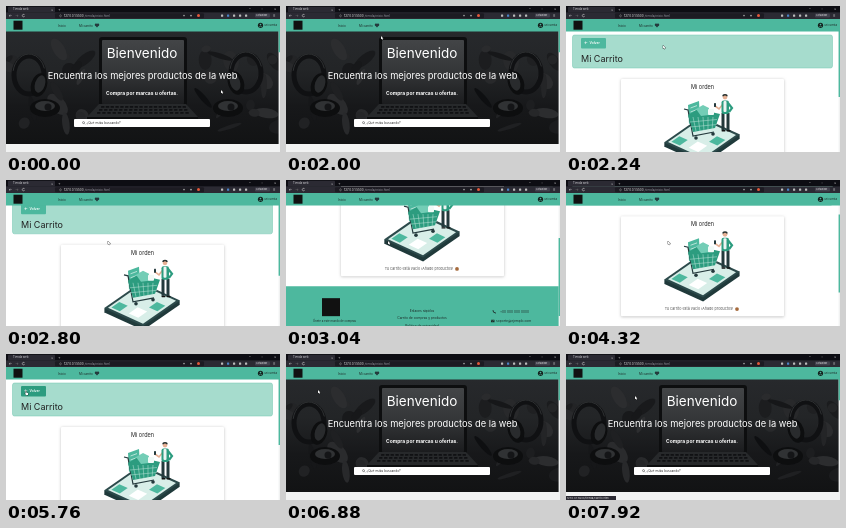
Recreate the animation shown at these times as an HTML page with a canvas. Size 274x146 px, loop 8000 ms.

```html
<!DOCTYPE html>
<html lang="es">
<head>
<meta charset="utf-8">
<title>Tienda</title>
<style>
html, body { margin: 0; width: 100%; height: 100%; overflow: hidden; background: #1c1b22; }
canvas { display: block; width: 274px; height: 146px; }
</style>
</head>
<body>
<canvas id="stage"></canvas>
<script>
const W = 274, H = 146, LOOP = 8000, STEP = 80;
const TEAL = '#4db89e', GREEN = '#2c9c7f', INK = '#1e2927', DARK = '#24393c', SKIN = '#e5b094';
const VIEW_TOP = 13, VIEW = H - VIEW_TOP;
const CART_HEIGHT = VIEW + 94, HOME_HEIGHT = VIEW * 4;

const canvas = document.getElementById('stage');
const ratio = window.devicePixelRatio || 1;
canvas.width = W * ratio;
canvas.height = H * ratio;
const c = canvas.getContext('2d');
c.scale(ratio, ratio);

const linear = k => k;
const smooth = k => k * k * (3 - 2 * k);
const glide = k => 1 - (1 - k) ** 1.4;

// Each move goes from the previous values to its own between start and end.
const scrolls = [
  { start: 2720, end: 3160, to: [94], ease: smooth },
  { start: 4000, end: 4400, to: [30], ease: glide },
  { start: 4640, end: 5200, to: [0], ease: smooth },
];
const moves = [
  { start: 560, end: 640, to: [97, 48] },
  { start: 720, end: 800, to: [111, 67] },
  { start: 1360, end: 1520, to: [75, 20] },
  { start: 1920, end: 2000, to: [95, 30] },
  { start: 2000, end: 2800, to: [102, 61] },
  { start: 4640, end: 5200, to: [25, 42] },
  { start: 5600, end: 5760, to: [19, 37] },
  { start: 6160, end: 6880, to: [32, 36] },
  { start: 6960, end: 7600, to: [109, 44] },
  { start: 7680, end: 7760, to: [92, 21] },
  { start: 7760, end: 7920, to: [69, 42] },
];

function follow(list, from, t) {
  return list.reduce((at, { start, end, to, ease = linear }) => {
    const k = ease(Math.min(1, Math.max(0, (t - start) / (end - start))));
    return at.map((v, i) => v + (to[i] - v) * k);
  }, from);
}

function seeded(seed) {
  return () => (seed = seed * 16807 % 2147483647) / 2147483647;
}

function rect(x, y, w, h, fill, r = 0) {
  c.fillStyle = fill;
  c.beginPath();
  c.roundRect(x, y, w, h, r);
  c.fill();
}

function oval(x, y, rx, ry, fill, tilt = 0) {
  c.fillStyle = fill;
  c.beginPath();
  c.ellipse(x, y, rx, ry, tilt, 0, 7);
  c.fill();
}

const disc = (x, y, r, fill) => oval(x, y, r, r, fill);

function ring(x, y, rx, ry, color, width, from = 0, to = Math.PI * 2) {
  c.strokeStyle = color;
  c.lineWidth = width;
  c.beginPath();
  c.ellipse(x, y, rx, ry, 0, from, to);
  c.stroke();
}

function trace(points, closed) {
  c.beginPath();
  points.forEach(p => c.lineTo(...p));
  if (closed) c.closePath();
}

function poly(fill, ...points) {
  trace(points, true);
  c.fillStyle = fill;
  c.fill();
}

function line(color, width, ...points) {
  trace(points);
  c.strokeStyle = color;
  c.lineWidth = width;
  c.stroke();
}

function text(str, x, y, size, color, align = 'left', weight = 400) {
  c.font = `${weight} ${size}px Inter, sans-serif`;
  c.textAlign = align;
  c.textBaseline = 'middle';
  c.fillStyle = color;
  c.fillText(str, x, y);
}

function gradient(y0, y1, ...colors) {
  const g = c.createLinearGradient(0, y0, 0, y1);
  colors.forEach((col, i) => g.addColorStop(i / (colors.length - 1), col));
  return g;
}

function drawBrowser() {
  rect(0, 0, W, 6.5, '#0d0d13');
  rect(2, 0.8, 47, 5.7, '#2b2a33', 1);
  text('Tienda web', 7, 3.6, 2.8, '#d5d5da');
  text('×', 45, 3.5, 3.5, '#bbb');
  text('+', 52, 3.5, 4, '#bbb');
  ['–', '▫', '×'].forEach((s, i) => text(s, 243 + i * 12.5, 3.2, 3.5, '#ccc'));

  rect(0, 6.5, W, 6.5, '#2b2a33');
  text('←', 2.5, 9.6, 4, '#ddd');
  text('→', 9, 9.6, 4, '#777');
  ring(17.5, 9.6, 1.3, 1.3, '#ddd', 0.5, 0.4, 5.8);
  rect(49, 7.3, 149, 5, '#1c1b22', 1);
  ring(54.5, 9.8, 0.8, 1.1, '#aaa', 0.4);
  text('127.0.0.1:5500', 58, 9.9, 3, '#eee');
  text('/tienda/inicio.html', 78.5, 9.9, 3, '#96969f');
  disc(178, 9.6, 0.8, '#aaa');
  disc(185, 9.6, 0.9, '#aaa');
  disc(192.5, 9.6, 1.5, '#e3583b');
  for (let i = 0; i < 5; i++) rect(215 + i * 6, 8.5, 2.2, 2.2, i === 1 ? '#4d83c7' : '#bbb', 0.5);
  rect(249, 7.6, 15, 4, '#42414d', 1);
  text('Actualizar', 250, 9.7, 2.4, '#ddd');
  text('≡', 267, 9.7, 4, '#ddd');
}

function drawNav() {
  rect(0, 13, W, 12.5, TEAL);
  rect(7.5, 14.7, 9, 9, '#111');
  text('Inicio', 52, 19.6, 3.1, INK);
  text('Mi carrito', 73, 19.6, 3.1, INK);
  disc(90, 18.7, 1.25, DARK);
  disc(92, 18.7, 1.25, DARK);
  poly(DARK, [88.9, 19.3], [93.1, 19.3], [91, 21.6]);
  disc(254.5, 19.3, 2.6, '#15211e');
  disc(254.5, 18.5, 0.8, TEAL);
  ring(254.5, 21.3, 1.3, 1.1, TEAL, 0.6, Math.PI, 0);
  text('Mi cuenta', 258.5, 19.6, 2.7, INK);
}

function drawScrollbar(scroll, height) {
  const scale = VIEW / height;
  rect(272.6, VIEW_TOP, 1.4, VIEW, '#f1f2f2');
  rect(272.6, VIEW_TOP + scroll * scale, 1.4, VIEW * scale, TEAL);
}

function headset(x, y, facing) {
  ring(x, y, 15, 19, '#101113', 5);
  ring(x, y - 1, 16, 20, '#3d3f41', 0.7, 3.3, 6);
  oval(x + facing * 10, y + 10, 8, 12, '#0d0e0f', facing * 0.3);
  oval(x + facing * 11, y + 9, 5, 9, '#292b2d', facing * 0.3);
}

function drawPhoto() {
  rect(0, 25, W, 113, gradient(25, 138, '#27292c', '#232527', '#17181a', '#121314'));

  // dim clutter on both sides of the desk
  const random = seeded(41);
  for (let i = 0; i < 36; i++) {
    const side = random() * 82, x = i % 2 ? side : W - side;
    const shade = 14 + random() * 32;
    oval(x, 40 + random() * 82, 4 + random() * 9, 2 + random() * 6,
      `rgb(${shade},${shade + 1},${shade + 3})`, random() * 3);
  }
  headset(23, 69, 1);
  headset(240, 67, -1);
  for (const x of [39, 222]) {
    oval(x, 102, 15, 9, '#0d0e0f');
    oval(x, 100, 10, 5, '#303234');
    disc(x + 3, 101, 3.5, '#141517');
  }

  // open computer with its keyboard
  rect(93, 31, 88, 72, '#0d0e0f', 3);
  rect(96, 34, 82, 64, gradient(34, 98, '#434547', '#343638', '#1b1c1e'), 1);
  poly('#27292b', [93, 98], [180, 98], [192, 111], [81, 111]);
  for (let row = 0; row < 3; row++) {
    for (let i = 0; i < 18; i++) {
      rect(95 - row * 2 + i * (4.8 + row * 0.2), 100 + row * 3, 3.4, 1.8, '#101113', 0.4);
    }
  }
  rect(81, 111, 111, 2, '#0c0d0e');
}

function drawHome() {
  rect(0, 13, W, 133, '#f1f2f2');
  drawPhoto();
  text('Bienvenido', 136, 48, 13.5, '#fff', 'center');
  text('Encuentra los mejores productos de la web', 136.5, 69.8, 9.3, '#fff', 'center');
  text('Compra por marcas u ofertas.', 136, 87.5, 4.95, '#fff', 'center', 700);
  rect(68, 113, 136, 8, '#fff', 1);
  ring(77.5, 116.6, 1, 1, '#222', 0.45);
  line('#222', 0.45, [78.2, 117.4], [79.1, 118.3]);
  text('¿Qué estás buscando?', 80.5, 117.2, 3.2, '#333');
  drawScrollbar(0, HOME_HEIGHT);
}

// Point on the tablet's tilted screen, u and v running from 0 to 1.
const iso = (u, v, drop = 0) => [102 + 35 * u + 33 * v, 136 + 16 * u - 23 * v + drop];

function tile(u, v, size, fill, drop = 0) {
  const u2 = u + size, v2 = v + size;
  poly(fill, iso(u, v, drop), iso(u2, v, drop), iso(u2, v2, drop), iso(u, v2, drop));
}

function drawShopper() {
  for (let drop = 4; drop >= 0; drop--) tile(-0.06, -0.06, 1.12, drop ? '#203a3b' : '#2c4a4b', drop);
  tile(0, 0, 1, '#d8eee8');
  tile(0.05, 0.05, 0.24, TEAL);
  tile(0.5, 0.1, 0.27, '#fff');
  tile(0.7, 0.5, 0.24, TEAL);

  // receipt
  poly(TEAL, [122, 99], [133, 95], [134, 113], [123, 118]);
  for (let y = 102; y < 113; y += 4) line('#e6f5f0', 0.7, [124.5, y], [131, y - 2.4]);

  // trolley
  line(DARK, 1.2, [118, 103], [122, 104], [127, 130], [148, 126]);
  poly(GREEN, [122, 109], [132, 103], [154, 108], [149, 122], [127, 126]);
  poly('#73cdb6', [130, 103], [137, 99], [143, 102], [143, 109], [135, 110]);
  rect(142, 103, 6, 6, '#f0faf7', 1);
  for (let i = 0; i < 5; i++) line('#bfe5da', 0.5, [127 + i * 5, 111], [130 + i * 4, 125]);
  for (let y = 116; y < 123; y += 5) line('#bfe5da', 0.5, [124, y], [151, y - 2.5]);
  disc(130, 132, 1.8, DARK);
  disc(147, 128, 1.8, DARK);

  // customer
  for (const x of [157, 162]) {
    line(DARK, 3, [x, 107], [x, 124]);
    rect(x - 1.5, 124, 4, 1.4, '#111', 0.6);
  }
  line(SKIN, 1.6, [157, 98], [153, 103], [149, 100]);
  line(GREEN, 2.2, [162, 97], [166, 102], [163, 106]);
  rect(155.5, 94.5, 7.5, 13.5, GREEN, 2);
  rect(157.5, 95, 3, 11, '#edf4f2', 1);
  disc(159, 91, 2.4, SKIN);
  ring(159, 90.2, 2, 1.5, '#26302f', 1.4, Math.PI, 0);
  rect(148, 97, 2, 4, DARK, 0.4);
}

function drawFooter() {
  rect(0, 183, W, 60, TEAL);
  rect(36, 195, 18, 18, '#111');
  text('Únete a este mundo de compras', 27, 218, 2.8, INK);
  ['Enlaces rápidos', 'Carrito de compras y productos', 'Política de privacidad']
    .forEach((s, i) => text(s, 136, 207.5 + i * 7.7, 3.3, INK, 'center'));
  line(INK, 0.9, [207, 207], [207.5, 209], [210, 210]);
  text('+00 000 000 0000', 214, 209, 3.2, INK);
  rect(205, 216.5, 3.5, 2.7, INK, 0.3);
  line(TEAL, 0.4, [205.2, 216.8], [206.7, 218], [208.3, 216.8]);
  text('soporte@ejemplo.com', 210, 218, 3.3, INK);
}

function drawCart(scroll, hover) {
  rect(0, 13, W, 133, '#fff');
  c.save();
  c.translate(0, -scroll);
  rect(6.5, 29, 260, 33, '#a6dccd', 2);
  c.strokeStyle = '#70c5ae';
  c.lineWidth = 0.5;
  c.stroke();
  rect(15, 32, 25, 10.5, hover ? GREEN : TEAL, 1);
  text('←', 18, 37.2, 4, '#fff', 'left', 700);
  text('Volver', 23.5, 37.4, 3.3, '#fff', 'left', 600);
  text('Mi Carrito', 15, 53.7, 9, '#222');

  c.save();
  c.shadowColor = 'rgba(0,0,0,.25)';
  c.shadowBlur = 3 * ratio;
  c.shadowOffsetY = 0.6 * ratio;
  rect(55, 73, 163, 100, '#fff', 1);
  c.restore();
  text('Mi orden', 136.5, 81.2, 5.5, '#222', 'center');
  drawShopper();
  text('Tu carrito está vacío ¡Añade productos!', 133, 166, 3.7, '#555', 'center');
  disc(171, 165.8, 1.9, '#a56a3c');
  drawFooter();
  c.restore();
  drawScrollbar(scroll, CART_HEIGHT);
}

function drawCursor(x, y, hand) {
  c.save();
  c.translate(x, y);
  if (hand) trace([[0.6, 0], [1.3, 0], [1.4, 1.7], [3.2, 2.1], [3, 4.1], [1.1, 4.2], [-0.1, 2.5], [0.6, 2.5]], true);
  else trace([[0, 0], [0, 3.3], [0.8, 2.7], [1.3, 3.8], [1.9, 3.5], [1.4, 2.5], [2.4, 2.4]], true);
  c.strokeStyle = '#111';
  c.lineWidth = 0.6;
  c.stroke();
  c.fillStyle = '#fff';
  c.fill();
  c.restore();
}

function draw(now) {
  const t = Math.floor(now % LOOP / STEP) * STEP;
  const [scroll] = follow(scrolls, [0], t);
  const [x, y] = follow(moves, [215, 84], t);
  const onCart = t >= 2080 && t < 6240;
  const onButton = onCart && t >= 5200;
  const onLink = !onCart && y < 25;

  if (onCart) drawCart(scroll, onButton); else drawHome();
  drawNav();
  drawBrowser();
  if (t >= 7760) {
    rect(0, 142, 50, 4, '#2b2a33');
    text('127.0.0.1:5500/tienda/carrito.html', 1, 144.1, 2.7, '#ddd');
  }
  drawCursor(x, y, onButton || onLink);
}

const start = performance.now();
function tick() {
  draw(performance.now() - start);
  requestAnimationFrame(tick);
}
tick();
</script>
</body>
</html>
```
